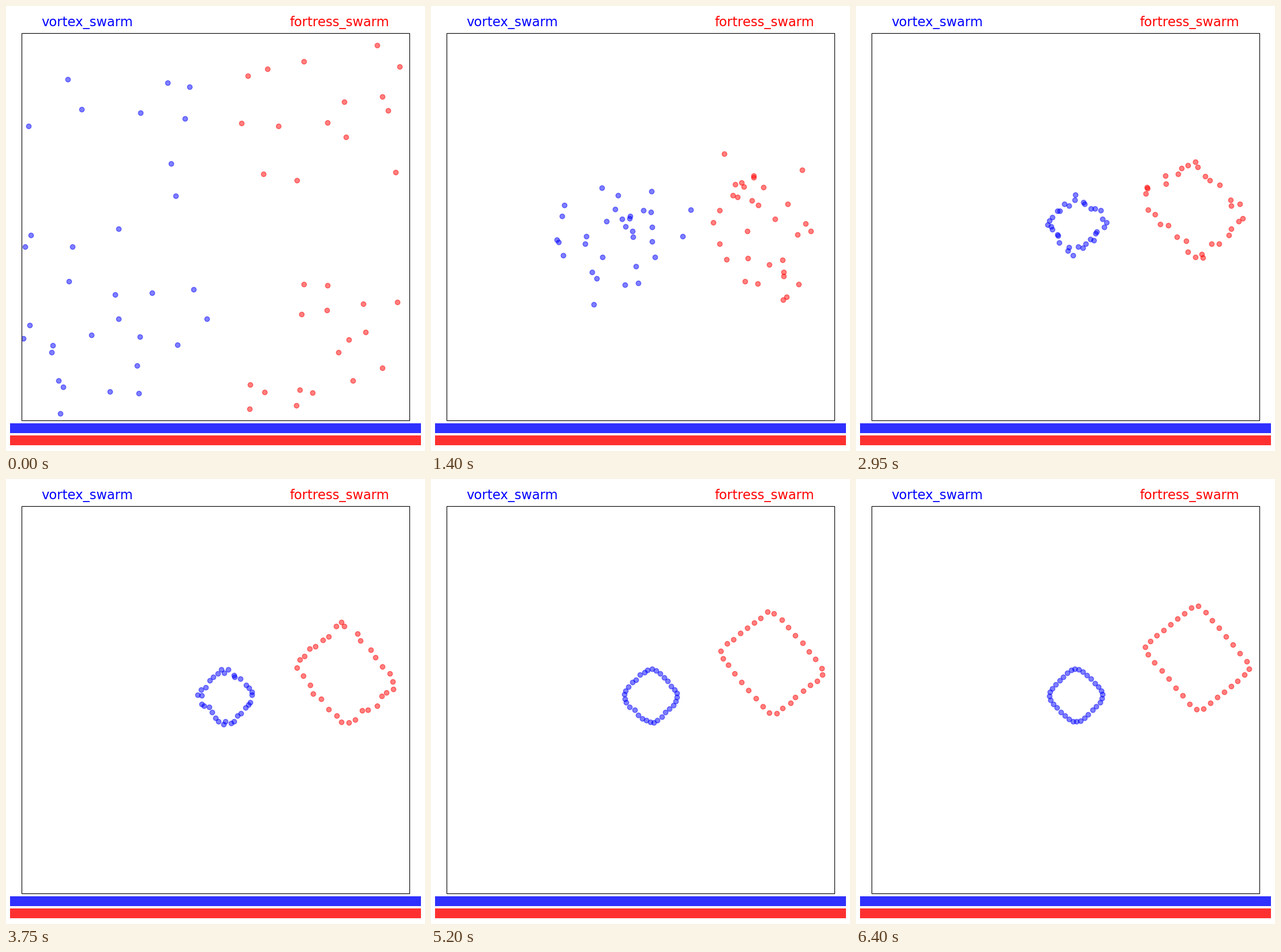
Animation of 726 by 771 pixels, one loop 6450 ms. Source, as a matplotlib script:

```python
import numpy as np
import matplotlib.pyplot as plt
from matplotlib.animation import FuncAnimation
from matplotlib.patches import Rectangle

W, H, DPI = 726, 771, 100
FRAMES, INTERVAL = 129, 50
N = 32
STEP = 6.72  # top speed per axis, pixels a frame
rng = np.random.default_rng(7)


def scatter(n, x0, x1, y0, y1):
    return np.column_stack([rng.uniform(x0, x1, n), rng.uniform(y0, y1, n)])


def wave(u, soft):
    """Triangle wave of period 32 whose peaks are rounded over `soft` slots."""
    d = np.abs((u + 16) % 32 - 16)
    e = np.minimum(d, 16 - d)
    height = np.where(e > soft, 8 - e, 8 - soft / 2 - e * e / (2 * soft))
    return np.where(d < 8, 1, -1) * height * 6.8 / (8 - soft / 2)


def blue_ring(t):
    u = np.arange(N) + 0.979 * (t - 15) + 0.17
    dx, dy = STEP * wave(u - 8, 2.5), -STEP * wave(u, 2.5)
    return np.column_stack([381 + dx, 373 + 16 * np.exp(-t / 60) + dy])


def red_ring(t):
    """A wider, slightly sheared ring that grows and drifts upwards."""
    u = np.arange(N) + 0.4075 * (t - 15) + 0.1
    size = 2 * STEP * (1 - 0.4 * np.exp(-t / 40))
    dx, dy = size * wave(u - 8, 1), -size * wave(u, 1)
    k = t / 132
    cx = 592 - 55 * np.exp(-t / 28)
    cy = 382 - 72 * k * k * (3 - 2 * k)
    return np.column_stack([cx + dx, cy + dy + 0.19 * dx])


def chase(start, ring):
    """Every dot runs after its slot, limited on each axis; the slots settle."""
    path = [rng.permutation(start)]
    jitter = rng.normal(0, 50, (N, 2))
    for t in range(1, FRAMES):
        gap = ring(t) + jitter * np.exp(-t / 25) - path[-1]
        path.append(path[-1] + np.clip(gap, -STEP, STEP))
    return path


blue = np.vstack([scatter(9, 37, 350, 57, 330), scatter(23, 29, 352, 365, 713)])
red = np.vstack([scatter(15, 378, 692, 58, 321), scatter(17, 415, 687, 481, 713)])
paths = [chase(blue, blue_ring), chase(red, red_ring)]

fig = plt.figure(figsize=(W / DPI, H / DPI), dpi=DPI, facecolor="white")
ax = fig.add_axes([0, 0, 1, 1])
ax.set(xlim=(0, W), ylim=(H, 0))
ax.axis("off")

frame = Rectangle((27, 47), 672, 671, fill=False, ec="black", lw=0.8, zorder=3)
ax.add_patch(frame)

dots = []
for color, name, x, y in [("blue", "vortex_swarm", 140.5, 723),
                          ("red", "fortress_swarm", 578, 744)]:
    ax.text(x, 35, name, color=color, fontsize=16.3, ha="center",
            va="baseline", family="DejaVu Sans")
    ax.add_patch(Rectangle((7, y), 712, 17, fc=color, ec="none", alpha=0.81))
    line, = ax.plot([], [], "o", color=color, ms=6, alpha=0.5)
    line.set_clip_path(frame)
    dots.append(line)


def update(t):
    for line, path in zip(dots, paths):
        line.set_data(path[t][:, 0], path[t][:, 1])
    return dots


anim = FuncAnimation(fig, update, frames=FRAMES, interval=INTERVAL,
                     init_func=lambda: update(0), repeat=True, repeat_delay=0)
plt.show()
```
